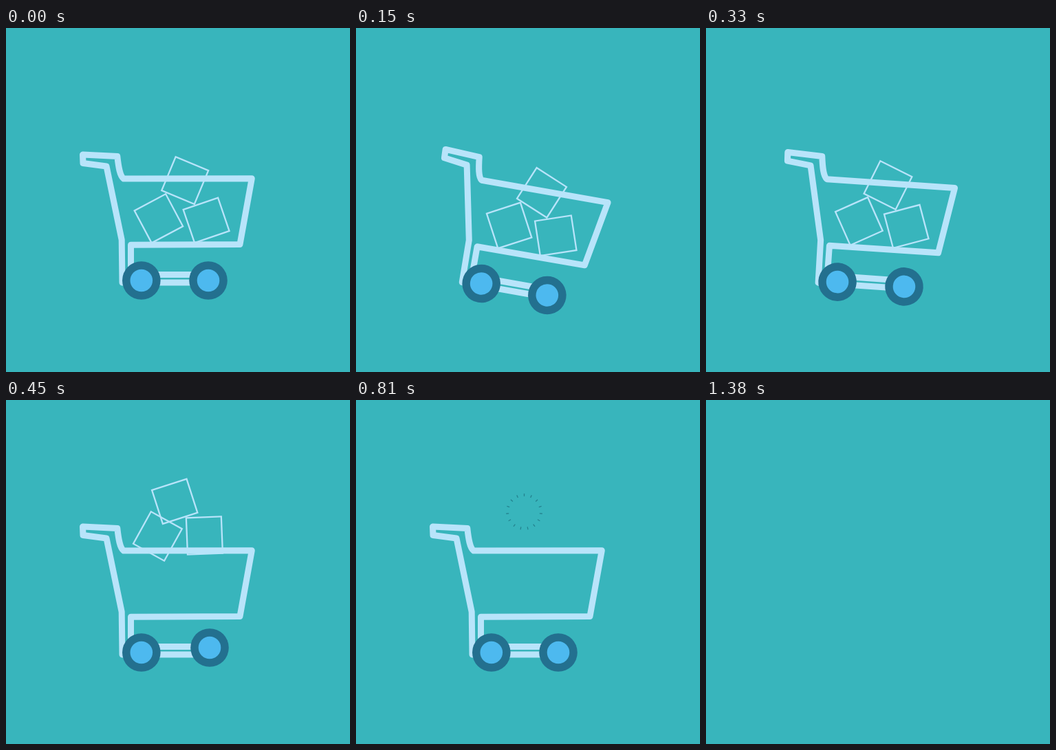
Recreate the animation shown at these times as an HTML page with a canvas. Size 500 by 500 pixels, loop 1.41 s.

```html
<!DOCTYPE html>
<html lang="en">
<head>
<meta charset="utf-8">
<title>Shopping cart</title>
<style>
  html, body { margin: 0; width: 100%; height: 100%; overflow: hidden; background: #38b5bc; }
  canvas { display: block; width: 100vw; height: 100vh; }
</style>
</head>
<body>
<canvas id="stage" width="500" height="500"></canvas>
<script>
const ctx = document.getElementById('stage').getContext('2d');

const LOOP = 1410, STEP = 30;
const BACK = '#38b5bc', LIGHT = '#b8e4fa', RIM = '#23708f', HUB = '#4db9ef', SPARK = '#24838f';
const PIVOT = { x: 164, y: 286 };
const BURST = { x: 244.5, y: 162.5 };

// Resting centre, size and angle, then total travel and spin while airborne.
const boxes = [
  { x: 260.2, y: 221.6, w: 51.5, h: 53, a: 22.6, dx: -20, dy: -99, spin: 66 },
  { x: 221.9, y: 276.8, w: 51.5, h: 53.2, a: -28, dx: -2, dy: -105, spin: 76 },
  { x: 291.1, y: 279.5, w: 53.3, h: 51, a: -18.8, dx: -3.6, dy: -110, spin: -98 }
];

const rad = deg => deg * Math.PI / 180;
const clamp = v => Math.min(1, Math.max(0, v));
const span = (t, from, to) => clamp((t - from) / (to - from));
const easeOut = u => 1 - (1 - u) * (1 - u);

function tiltAt(t) {
  return t < 240 ? 16.1 * span(t, 0, 240) : 16.1 * (1 - span(t, 240, 360));
}

function rotateAbout(p, deg) {
  ctx.translate(p.x, p.y);
  ctx.rotate(rad(deg));
  ctx.translate(-p.x, -p.y);
}

function drawFrame() {
  ctx.strokeStyle = LIGHT;
  ctx.lineWidth = 9;
  ctx.lineJoin = ctx.lineCap = 'round';
  ctx.beginPath();
  ctx.moveTo(111.5, 184);
  ctx.lineTo(161.8, 186.5);
  ctx.bezierCurveTo(163.5, 202, 165.5, 215, 171, 219);
  ctx.lineTo(357.3, 218.8);
  ctx.lineTo(340, 314.5);
  ctx.lineTo(181.5, 315.2);
  ctx.lineTo(181.5, 358.5);
  ctx.lineTo(286, 358.5);
  ctx.lineTo(286, 370);
  ctx.lineTo(169, 370);
  ctx.lineTo(168.2, 308);
  ctx.lineTo(146, 201);
  ctx.lineTo(112, 196.5);
  ctx.closePath();
  ctx.stroke();
}

function disc(x, y, r, color) {
  ctx.fillStyle = color;
  ctx.beginPath();
  ctx.arc(x, y, r, 0, 2 * Math.PI);
  ctx.fill();
}

function drawWheel(x, y) {
  disc(x, y, 27.8, RIM);
  disc(x, y, 16.3, HUB);
}

function drawBoxes(t) {
  const fly = easeOut(span(t, 360, 540));
  const size = 1 - span(t, 540, 630);
  if (size === 0) return;
  ctx.save();
  ctx.translate(BURST.x, BURST.y);
  ctx.scale(size, size);
  ctx.translate(-BURST.x, -BURST.y);
  ctx.strokeStyle = LIGHT;
  ctx.lineWidth = 2.3;
  ctx.lineJoin = 'miter';
  for (const b of boxes) {
    ctx.save();
    ctx.translate(b.x + b.dx * fly, b.y + b.dy * fly);
    ctx.rotate(rad(b.a + b.spin * fly));
    ctx.strokeRect(-b.w / 2, -b.h / 2, b.w, b.h);
    ctx.restore();
  }
  ctx.restore();
}

function drawBurst(t) {
  if (t < 730 || t >= 1140) return;
  const outer = 75 * easeOut(span(t, 730, 1140));
  const inner = Math.max(0, outer - 4);
  ctx.strokeStyle = SPARK;
  ctx.lineWidth = 1.3;
  ctx.lineCap = 'butt';
  ctx.beginPath();
  for (let i = 0; i < 15; i++) {
    const a = rad(i * 24 - 90);
    const c = Math.cos(a), s = Math.sin(a);
    ctx.moveTo(BURST.x + inner * c, BURST.y + inner * s);
    ctx.lineTo(BURST.x + outer * c, BURST.y + outer * s);
  }
  ctx.stroke();
}

function draw(t) {
  ctx.fillStyle = BACK;
  ctx.fillRect(0, 0, 500, 500);
  if (t >= 1380) return;

  const hop = Math.sin(Math.PI * span(t, 360, 540));
  ctx.save();
  rotateAbout(PIVOT, tiltAt(t));
  drawFrame();
  drawWheel(196.8, 367);
  drawWheel(294 + 2 * hop, 367 - 7 * hop);
  drawBoxes(t);
  ctx.restore();
  drawBurst(t);
}

const start = performance.now();
function tick() {
  const t = (performance.now() - start) % LOOP;
  draw(Math.floor(t / STEP) * STEP);
  requestAnimationFrame(tick);
}
tick();
</script>
</body>
</html>
```
